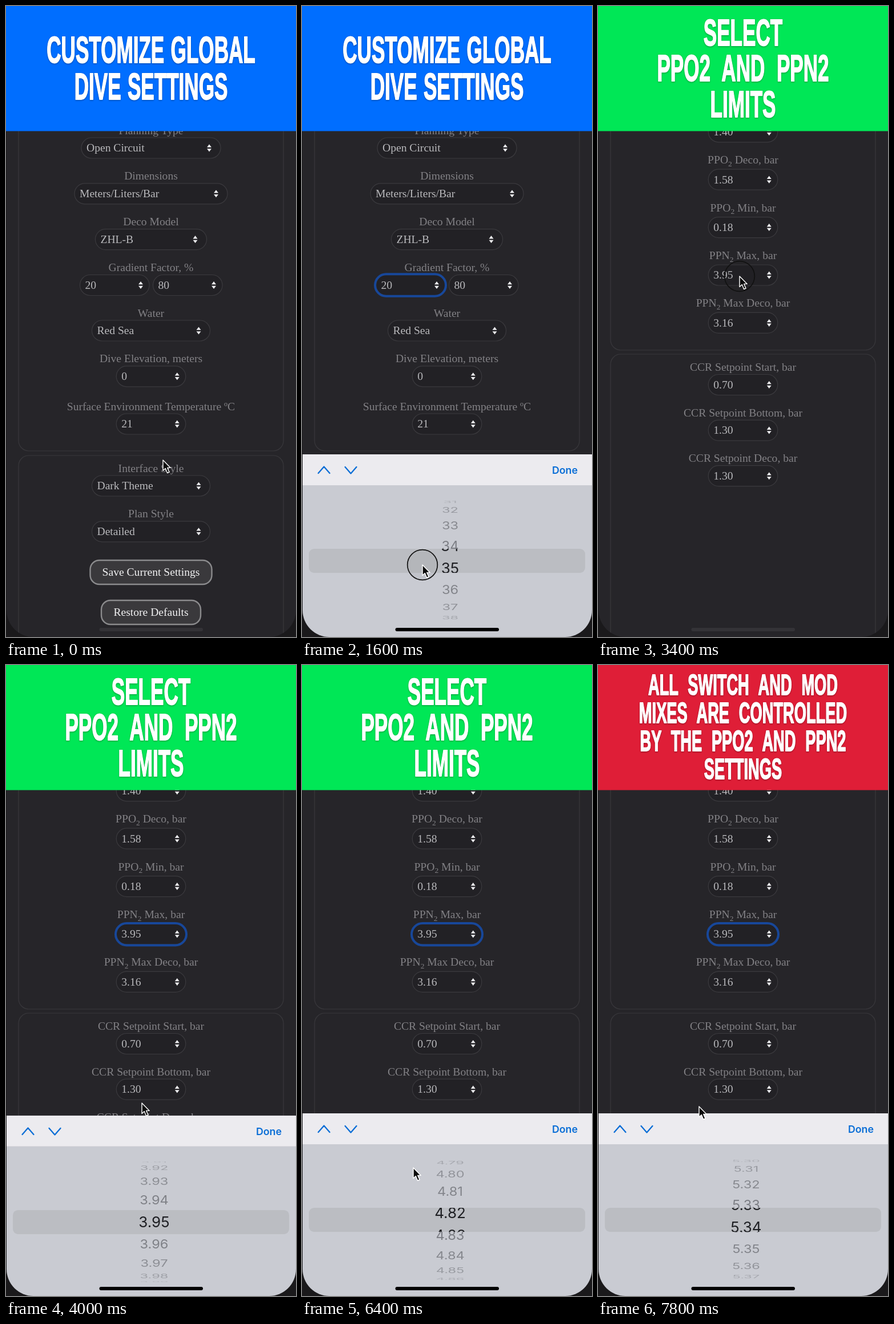
These frames come from a looping animation (508 px wide and 1102 px high, 8 s). An HTML page:

```html
<!DOCTYPE html>
<html lang="en">
<head>
<meta charset="utf-8">
<title>Dive settings</title>
<style>
  html, body { margin: 0; width: 100%; height: 100%; overflow: hidden; background: #1a191b; }
  svg { display: block; width: 508px; height: 1102px; }
  .form { font: 19.6px "Liberation Serif", "Times New Roman", serif; }
  .label { fill: #828185; text-anchor: middle; }
  .value { fill: #b9b9bc; }
  .pill { fill: #222125; stroke: #3b3a3e; stroke-width: 1.2; }
  .panel { fill: none; stroke: #39383c; stroke-width: 1.2; }
  .arrows { fill: #ececee; }
  .button rect { fill: #3a393c; stroke: #8b8b8d; stroke-width: 2.4; }
  .button text { fill: #f2f2f3; text-anchor: middle; }
  .ring { fill: none; stroke: #17479a; stroke-width: 4; }
  .headline { font-family: "Liberation Sans", Arial, sans-serif; font-weight: 700; text-anchor: middle;
    fill: #fff; stroke: #fff; stroke-width: 2; stroke-linejoin: round;
    filter: drop-shadow(0 1px 1.5px rgba(0, 0, 0, .35)); }
  .wheel { font-family: Inter, "Liberation Sans", sans-serif; text-anchor: middle; }
  .done { font: 600 17.8px Inter, "Liberation Sans", sans-serif; fill: #0a6ed6; text-anchor: end; }
  .chevron { fill: none; stroke: #0a6ed6; stroke-width: 2.3; stroke-linecap: round; stroke-linejoin: round; }
</style>
</head>
<body>
<svg viewBox="0 0 508 1102">
  <defs>
    <clipPath id="screen"><rect x="1" y="150" width="507" height="952" rx="47"/></clipPath>
    <clipPath id="inBar"><rect x="12" y="948" width="484" height="42"/></clipPath>
    <clipPath id="offBar"><path d="M0 850H508V948H0ZM0 990H508V1090H0Z"/></clipPath>
  </defs>
  <rect width="508" height="1102" fill="#1a191b"/>
  <g clip-path="url(#screen)">
    <rect y="150" width="508" height="952" fill="#262529"/>
    <g id="general" class="form"></g>
    <g id="limits" class="form"></g>
    <g id="sheet">
      <rect y="783" width="508" height="54" fill="#ecebef"/>
      <rect y="837" width="508" height="270" fill="#c9cbd2"/>
      <path class="chevron" d="M28.5 816l10-11.500 10 11.500M75.500 805l10 11.500 10-11.500"/>
      <text class="done" x="483" y="817">Done</text>
      <rect x="12" y="948" width="484" height="42" rx="9" fill="#bbbdc2"/>
      <g class="wheel" clip-path="url(#offBar)" id="farRows" font-size="23.6" fill="#33353a"></g>
      <g class="wheel" clip-path="url(#inBar)" id="nearRows" font-size="26" fill="#1e1f23"></g>
    </g>
    <rect id="homeBar" x="163.5" y="1086" width="181.5" height="6" rx="3"/>
  </g>
  <g id="banners"></g>
  <g id="pointer">
    <circle id="touch" r="26.3" fill="#000" fill-opacity=".04" stroke="#111" stroke-width="1.7"/>
    <path d="M0 0v18.500l4.300-3.900 3.300 7.900 3.400-1.500-3.300-7.600h5.500z" fill="#0b0b0b" stroke="#fff" stroke-width="1.4" stroke-linejoin="round"/>
  </g>
</svg>
<script>
const LOOP = 8000, STEP = 200;
const LIMITS_AT = 3000, WARNING_AT = 6800;
const MID = 254, SHEET_HEIGHT = 319;
const NARROW = 121.5, MEDIUM = 207;
const $ = id => document.getElementById(id);

// Form parts
const pill = (x, y, w, value, id = '') => {
  const ax = x + w - (w > 150 ? 20 : 15);
  return `<rect class="pill" x="${x}" y="${y - 18}" width="${w}" height="36" rx="18"/>
    <text class="value" x="${x + 9}" y="${y + 6.3}" id="${id}">${value}</text>
    <path class="arrows" d="M${ax} ${y - 6.5}l4 5.300h-8zM${ax} ${y + 6.5}l4 -5.300h-8z"/>`;
};
const label = (text, y) => {
  const [head, tail] = text.split('_2');
  const sub = tail === undefined ? '' :
    `<tspan dy="4.5" font-size="13.5">2</tspan><tspan dy="-4.5">${tail}</tspan>`;
  return `<text class="label" x="${MID}" y="${y + 6}">${head}${sub}</text>`;
};
const field = (y, name, value, w = NARROW) =>
  label(name, y - (name.includes('_2') ? 34 : 30.5)) + pill(MID - w / 2, y, w, value);
const stack = (y, pitch, fields) => fields.map((f, i) => field(y + i * pitch, ...f)).join('');
const panel = (y, bottom) =>
  `<rect class="panel" x="22" y="${y}" width="464" height="${bottom - y}" rx="18"/>`;
const button = (text, y, w) => `<g class="button">
  <rect x="${MID - w / 2}" y="${y - 21}" width="${w}" height="42" rx="16"/>
  <text x="${MID}" y="${y + 6.3}">${text}</text></g>`;
const ring = (id, mid, y) =>
  `<rect class="ring" id="${id}" x="${mid - 62}" y="${y - 19.3}" width="124" height="38.6" rx="19.3"/>`;

$('general').innerHTML = panel(100, 777) + panel(785, 1140) +
  stack(248, 79.8, [
    ['Planning Type', 'Open Circuit', 244],
    ['Dimensions', 'Meters/Liters/Bar', 268],
    ['Deco Model', 'ZHL-B', 195],
  ]) +
  label('Gradient Factor, %', 457) +
  pill(129.5, 487.5, NARROW, 20, 'gradientLow') + pill(257.5, 487.5, NARROW, 80) +
  stack(567, 79.8, [['Water', 'Red Sea', MEDIUM], ['Dive Elevation, meters', 0]]) +
  field(730, 'Surface Environment Temperature ºC', 21) +
  stack(838, 79.8, [['Interface Style', 'Dark Theme', MEDIUM], ['Plan Style', 'Detailed', MEDIUM]]) +
  button('Save Current Settings', 989, 213) + button('Restore Defaults', 1059, 174) +
  ring('gradientRing', 190, 487.5);

$('limits').innerHTML = panel(100, 601) + panel(608, 1140) +
  stack(219.8, 83.4, [
    ['PPO_2 Bottom, bar', '1.40'],
    ['PPO_2 Deco, bar', '1.58'],
    ['PPO_2 Min, bar', '0.18'],
    ['PPN_2 Max, bar', '3.95'],
    ['PPN_2 Max Deco, bar', '3.16'],
  ]) +
  stack(661.5, 79.6, [
    ['CCR Setpoint Start, bar', '0.70'],
    ['CCR Setpoint Bottom, bar', '1.30'],
    ['CCR Setpoint Deco, bar', '1.30'],
  ]) +
  ring('limitRing', MID, 470.3);

// Banners, each shown from its start time on
const banners = [
  { from: 0, color: '#006eff', size: 65, top: 99, pitch: 64, gap: 3,
    lines: ['CUSTOMIZE GLOBAL', 'DIVE SETTINGS'] },
  { from: LIMITS_AT, color: '#00e756', size: 65, top: 69, pitch: 62.5, gap: 20,
    lines: ['SELECT', 'PPO2 AND PPN2', 'LIMITS'] },
  { from: WARNING_AT, color: '#df1e37', size: 50.5, top: 52.5, pitch: 49, gap: 17,
    lines: ['ALL SWITCH AND MOD', 'MIXES ARE CONTROLLED', 'BY THE PPO2 AND PPN2', 'SETTINGS'] },
];
$('banners').innerHTML = banners.map(b => `<g>
  <rect width="508" height="218.5" fill="${b.color}"/>
  <g class="headline" font-size="${b.size}" word-spacing="${b.gap}" transform="translate(${MID}) scale(.54 1)">
  ${b.lines.map((line, i) => `<text y="${b.top + i * b.pitch}">${line}</text>`).join('')}</g></g>`).join('');

// Pointer stops; a tap shows the touch ring, a spin flicks the wheel by that many rows
const stops = [
  { t: 0, x: 275, y: 793 },
  { t: 400, x: 190, y: 488, tap: true },
  { t: 1000, x: 212, y: 1010, tap: true, spin: 23.21 },
  { t: 1600, x: 211, y: 976, tap: true },
  { t: 2200, x: 218, y: 780, tap: true },
  { t: 2600, x: 218, y: 780 },
  { t: 3400, x: 248, y: 472, tap: true },
  { t: 4000, x: 238, y: 765 },
  { t: 4400, x: 240, y: 1000, tap: true, spin: 43.79 },
  { t: 5400, x: 244, y: 896 },
  { t: 5600, x: 215, y: 1000, tap: true, spin: 61.22 },
  { t: 6400, x: 195, y: 878 },
  { t: 6800, x: 190, y: 1000, tap: true, spin: 43.61 },
  { t: 7800, x: 177, y: 771 },
];

const clamp = u => Math.min(1, Math.max(0, u));
const smooth = u => u * u * (3 - 2 * u);
const slide = (t, start) => 1 - (1 - clamp((t - start) / 520)) ** 3;
const coast = (t, start) => 1 - Math.exp(-Math.max(0, t - start) / 600);

function pointerAt(t) {
  const i = stops.findLastIndex(s => s.t <= t);
  const a = stops[i], b = stops[i + 1] ?? a;
  const u = a === b ? 0 : smooth((t - a.t) / (b.t - a.t));
  return [a.x + (b.x - a.x) * u, a.y + (b.y - a.y) * u];
}

const spun = (t, from) => stops.reduce((sum, s) =>
  s.spin && s.t >= from ? sum + s.spin * coast(t, s.t) : sum, 0);

// Rows lie on a drum seen from the front
function drumRows(position, format, fade) {
  const radius = 105, spacing = 21.5;
  let rows = '';
  for (let n = Math.ceil(position - 4.1); n <= position + 4.1; n++) {
    const angle = (n - position) * spacing * Math.PI / 180;
    const tilt = Math.cos(angle);
    if (tilt < .03) continue;
    const opacity = fade ? .1 + .42 * tilt : 1;
    rows += `<text transform="translate(259.5 ${969 + radius * Math.sin(angle)}) scale(1 ${tilt})" y=".364em" opacity="${opacity}">${format(n)}</text>`;
  }
  return rows;
}

const show = (el, on) => { el.style.display = on ? '' : 'none'; };

function draw(t) {
  const onLimits = t >= LIMITS_AT;
  show($('general'), !onLimits);
  show($('limits'), onLimits);
  [...$('banners').children].forEach((el, i) =>
    show(el, t >= banners[i].from && t < (banners[i + 1]?.from ?? LOOP)));

  show($('gradientRing'), t >= 600 && t < 2400);
  show($('limitRing'), t >= 3600);
  $('gradientLow').textContent = t < 2000 ? 20 : 35;

  const open = slide(t, 600) - slide(t, 2200) + slide(t, 3600);
  $('sheet').setAttribute('transform', `translate(0 ${SHEET_HEIGHT * (1 - open)})`);
  $('homeBar').setAttribute('fill', open > .1 ? '#000' : '#343337');

  const position = onLimits ? 395 + spun(t, LIMITS_AT) : Math.min(35, 20 + spun(t, 0));
  const format = n => onLimits ? (n / 100).toFixed(2) : n;
  $('farRows').innerHTML = drumRows(position, format, true);
  $('nearRows').innerHTML = drumRows(position, format, false);

  $('pointer').setAttribute('transform', `translate(${pointerAt(t).join(' ')})`);
  show($('touch'), stops.some(s => s.tap && t >= s.t && t <= s.t + STEP));
}

const start = performance.now();
let shown = -1;
function tick() {
  const t = Math.floor((performance.now() - start) % LOOP / STEP) * STEP;
  if (t !== shown) draw(shown = t);
  requestAnimationFrame(tick);
}
tick();
</script>
</body>
</html>
```
